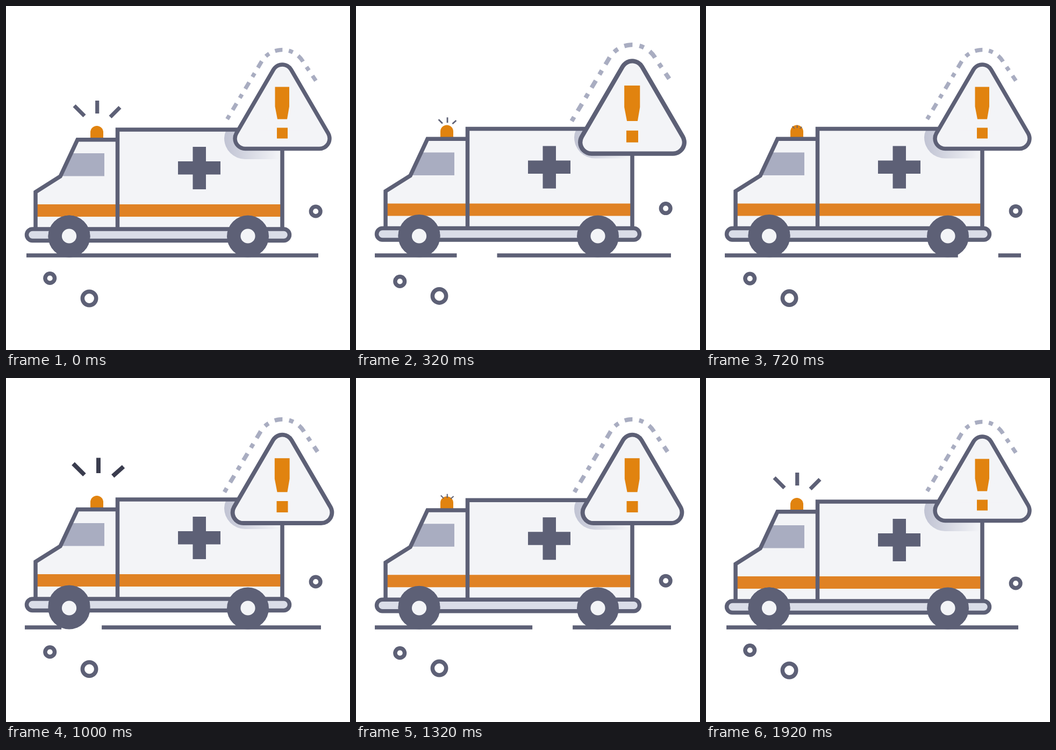
Recreate the animation shown at these times as an HTML page. Size 640 px wide and 640 px high, loop 2440 ms.

```html
<!DOCTYPE html>
<html lang="en">
<head>
<meta charset="utf-8">
<title>Ambulance alert</title>
<style>
  html, body { margin: 0; width: 100%; height: 100%; overflow: hidden; background: #fff; }
  svg { display: block; width: 100%; height: 100%; }
  .ink { fill: #5d6076; }
  .line { fill: none; stroke: #5d6076; stroke-width: 7.5; }
  .pale { fill: #f3f4f7; }
  .haze { fill: #a9adc1; }
  .amber { fill: #e1830f; }
  .ring { fill: #fff; stroke: #5d6076; }
</style>
</head>
<body>
<svg viewBox="0 0 640 640">
  <defs>
    <linearGradient id="shade" gradientUnits="userSpaceOnUse" x1="406" y1="0" x2="510" y2="0">
      <stop offset="0" stop-color="#c0c3d3"/>
      <stop offset="1" stop-color="#f3f4f7"/>
    </linearGradient>
  </defs>

  <path id="road" class="line" d="M35 464H586"/>

  <g id="van">
    <path class="amber" d="M157 246V235a12 12 0 0 1 24 0V246Z"/>
    <path class="pale" d="M207.5 249H133L101 317L55 346V414H514V230H207.5Z"/>
    <path d="M409 233Q406 239 406 246A39 39 0 0 0 445 285H511V233Z" fill="url(#shade)"/>
    <path class="haze" d="M125 274H183V316.5H104.500Z"/>
    <path d="M58 369H511V392H58Z" fill="#e08224"/>
    <path class="line" d="M207.5 248.700H133L101 317L55 346V414M207.500 414V230H514V414"/>
    <path class="ink" d="M347.500 262H372V289H399V313.500H372V341H347.500V313.500H320V289H347.500Z"/>
    <rect x="38.500" y="415" width="489" height="21.500" rx="10.700" fill="#dadde8" stroke="#5d6076" stroke-width="7.500"/>
    <circle class="ink" cx="117.500" cy="428.500" r="39"/>
  </g>

  <g id="wheels"></g>
  <g id="rays" stroke-width="7.200"></g>

  <g id="sign">
    <path d="M411.500 210.500L474.500 105A45 45 0 0 1 553.500 105L576.500 139" fill="none"
          stroke="#a9adc1" stroke-width="7.500" stroke-dasharray="8 11.900 14 11.900"/>
    <g stroke-linejoin="round">
      <path d="M445 246.500L514 128L583 246.500Z" fill="#5d6076" stroke="#5d6076" stroke-width="45.500"/>
      <path d="M445 246.500L514 128L583 246.500Z" fill="#f3f4f7" stroke="#f3f4f7" stroke-width="30.500"/>
    </g>
    <path class="amber" d="M500.500 150.500H527V187L523 210.500H505L500.500 187ZM504 226.500H524V246.500H504Z"/>
  </g>

  <circle id="bubbleA" class="ring" cx="576.200" cy="382" r="8.800" stroke-width="7.500"/>
  <circle id="bubbleB" class="ring" cx="81.700" cy="506.500" r="8.800" stroke-width="7.500"/>
  <circle id="bubbleC" class="ring" cx="155" cy="544" r="12.700" stroke-width="7.500"/>
</svg>

<script>
const STEP = 40, LOOP = 2440, LAST = 48, RUN_END = 40;
const $ = id => document.getElementById(id);
const clamp = (v, lo, hi) => Math.min(hi, Math.max(lo, v));
const wave = (i, period) => (1 - Math.cos(2 * Math.PI * i / period)) / 2;
const shift = (id, y) => $(id).setAttribute('transform', `translate(0 ${y})`);

$('wheels').innerHTML = [117.5, 450].map(x =>
  `<circle class="ink" cx="${x}" cy="428.5" r="39"/><circle class="pale" cx="${x}" cy="428" r="13.600"/>`).join('');

// Rays are drawn around the beacon and scaled outwards.
const BURST = 'M2.7-82V-56M-40-72L-21-53M45-67L27-51';
const REST = 'M.7-63V-39M-42-53.500L-23-34.500M43-50.500L25-32.500';
$('rays').innerHTML = '<path/>';
const rays = $('rays').firstChild;

// Each burst: [step, scale] points from birth to vanishing.
const bursts = [
  [[4, 0], [12, .77], [16, 1.15]],
  [[17, .1], [18, .21], [25, 1.1], [28, 1.2]],
  [[30, 0], [33, .28], [40, 1.1], [42, 1.15]]
];

function scaleAt(points, i) {
  for (let k = 1; k < points.length; k++) {
    const [a, s] = points[k - 1], [b, e] = points[k];
    if (i <= b) return s + (e - s) * (i - a) / (b - a);
  }
}

function rayPose(i) {
  if (i < 4) return { d: REST, s: 1 + i * .03, alpha: 1 - i / 4 };
  if (i >= 43) return { d: REST, s: 1 - ((LAST - i) / 6) ** 2, alpha: 1 };
  const points = bursts.find(b => i >= b[0][0] && i <= b[b.length - 1][0]);
  if (!points) return { d: BURST, s: 0, alpha: 0 };
  const end = points[points.length - 1][0];
  return { d: BURST, s: scaleAt(points, i), alpha: clamp((end + 1 - i) / 3, 0, 1) };
}

function drawRays(i, bob) {
  const { d, s, alpha } = rayPose(i);
  const dark = d === BURST ? clamp((s - .7) / .4, 0, 1) : 0;
  const tone = [93, 96, 118].map((c, k) => Math.round(c + ([58, 60, 78][k] - c) * dark));
  rays.setAttribute('d', d);
  rays.setAttribute('stroke', `rgb(${tone})`);
  rays.setAttribute('opacity', s > 0 ? alpha : 0);
  rays.setAttribute('transform', `translate(169 ${239 + bob * .1}) scale(${s})`);
}

function drawRoad(i, running) {
  const road = $('road');
  road.setAttribute('d', running ? 'M35 464H586' : 'M38 464H581');
  road.setAttribute('stroke-dasharray', running ? '487.5 75' : 'none');
  road.setAttribute('stroke-dashoffset', running ? -(2.5 + 28.125 * i) : 0);
}

function draw(ms) {
  const i = Math.min(LAST, Math.floor((ms % LOOP) / STEP));
  const running = i > 0 && i < RUN_END;
  const bob = running ? -4.1 * wave(i, 10) : 0;
  const drift = running ? wave(i, 20) : 0;
  const pulse = running ? 1 - wave(i, 4) : 0;

  shift('van', bob);
  shift('bubbleA', -6 * drift);
  shift('bubbleB', 6.5 * drift);
  shift('bubbleC', -5 * drift);
  $('sign').setAttribute('transform',
    `translate(514 175) scale(${1 + .1 * pulse}) translate(-514 -175)`);
  drawRoad(i, running);
  drawRays(i, bob);
}

const start = performance.now();
function tick() {
  draw(performance.now() - start);
  requestAnimationFrame(tick);
}
tick();
</script>
</body>
</html>
```
